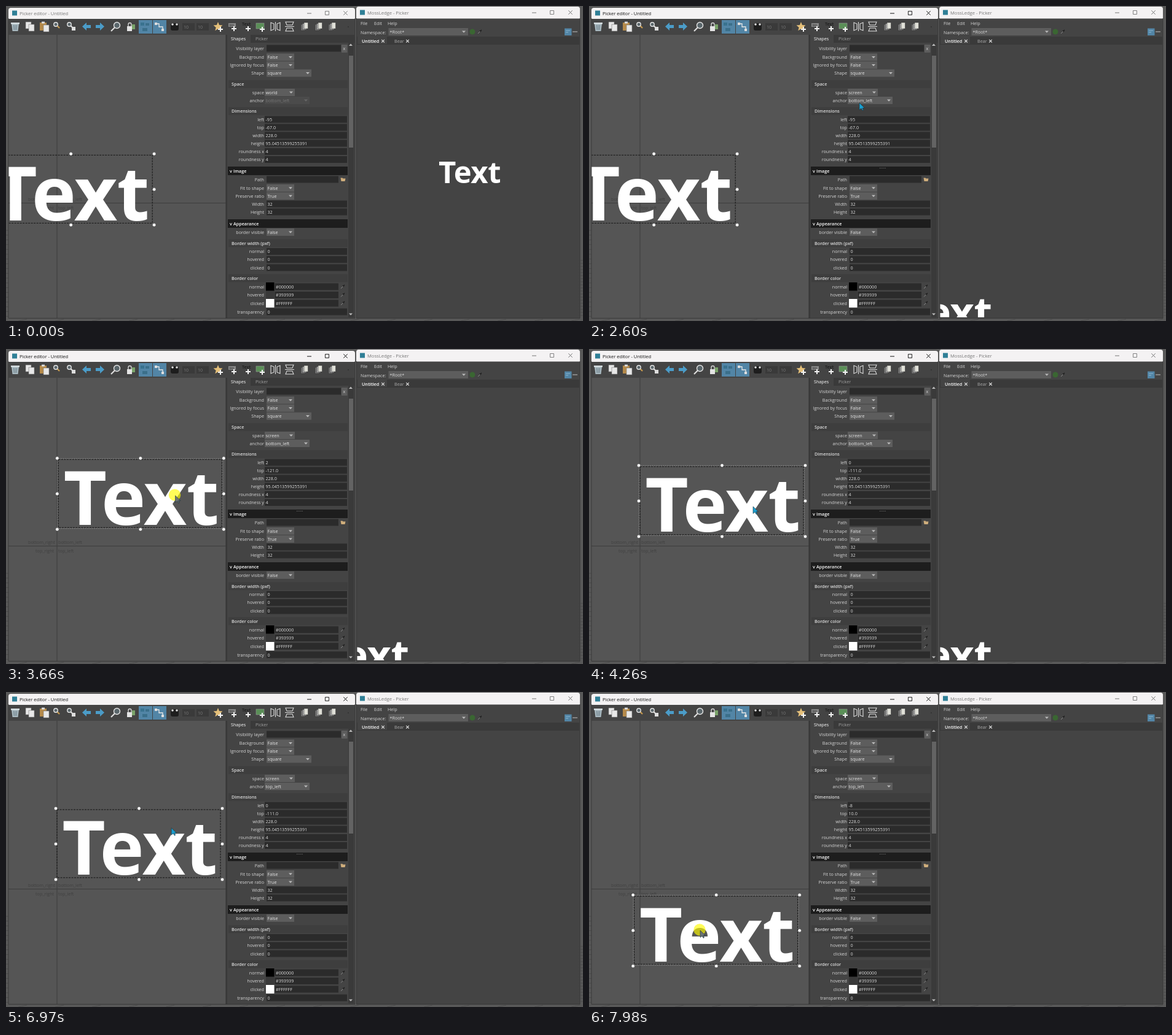
An HTML page for the animation above (8 s loop, 939 by 514 pixels).

```html
<!DOCTYPE html>
<html lang="en">
<head>
<meta charset="utf-8">
<title>Picker editor</title>
<style>
  html, body { margin: 0; width: 100%; height: 100%; overflow: hidden; background: #585858; }
  svg { display: block; width: 100%; height: 100%; font: 7.2px 'Open Sans', sans-serif; }
  text { white-space: pre; }
  .b { font-weight: 600; }
  .big { font-weight: 700; font-kerning: normal; letter-spacing: -.006em; fill: #fff; }
  .title { font-size: 7.6px; }
</style>
</head>
<body>
<svg viewBox="0 0 939 514" xmlns="http://www.w3.org/2000/svg"></svg>
<script>
const svg = document.querySelector('svg');
const $ = id => document.getElementById(id);
const INK = '#d6d6d6', PANEL = '#444', FIELD = '#2b2b2b', BUTTON = '#5d5d5d', BLUE = '#5285a6';

const rect = (x, y, w, h, fill, more = '') =>
  `<rect x="${x}" y="${y}" width="${w}" height="${h}" fill="${fill}" ${more}/>`;
const text = (x, y, s, fill = INK, more = '') =>
  `<text x="${x}" y="${y}" fill="${fill}" ${more}>${s}</text>`;
const fill = (d, color, more = '') => `<path d="${d}" fill="${color}" ${more}/>`;
const line = (d, color, w = 1, more = '') =>
  `<path d="${d}" fill="none" stroke="${color}" stroke-width="${w}" ${more}/>`;
const dot = (x, y, r, color, more = '') => `<circle cx="${x}" cy="${y}" r="${r}" fill="${color}" ${more}/>`;
const group = (id, body, more = '') => `<g id="${id}" ${more}>${body}</g>`;
const arrow = (x, y, color = '#bbb') => fill(`M${x - 3} ${y - 1.6}h6l-3 3.4z`, color);
const pencil = (x, y) =>
  line(`M${x - 3} ${y + 3}l4-4`, '#999', .8) + line(`M${x} ${y - 2}l2 2M${x + 1} ${y - 1}l2-2`, '#1c1c1c', 1.2);
const cross = (x, y, r, color, w = 1) =>
  line(`M${x - r} ${y - r}l${2 * r} ${2 * r}M${x + r} ${y - r}l${-2 * r} ${2 * r}`, color, w);

// Form rows of the property panel, placed by their middle line
const label = (y, s) => text(420, y + 2.6, s, INK, 'text-anchor="end"');
const field = (y, x, x2, s = '', id = '') =>
  rect(x, y - 5.5, x2 - x, 11, FIELD) + text(x + 1.5, y + 2.6, s, '#ddd', id && `id="${id}"`);
const combo = (y, x, x2, s, id = '') =>
  rect(x, y - 6, x2 - x, 12, BUTTON) +
  text(x + 1.5, y + 2.6, s, '#e4e4e4', id && `id="${id}"`) + arrow(x2 - 6, y);
const header = (y, s) => rect(362, y - 6.5, 194, 13, '#3e3e3e') + text(367, y + 2.6, s, '#ddd', 'class="b"');
const fold = (y, s) => rect(361, y - 7, 195, 14, '#1d1d1d') +
  text(364, y + 2.7, 'v', '#fff', 'class="b"') + text(370, y + 2.7, s, '#fff', 'class="b"');
const swatch = (y, s, c) => label(y, s) + rect(423, y - 7, 13.5, 14, c) + field(y, 437.5, 541, c) + pencil(548, y);

function titleBar(x, y, w, name, id) {
  const cy = 11.5 + (y - 3) / 2, r = x + w;
  const controls = line(`M${r - 78} ${cy + .5}h7`, 'currentColor') +
    line(`M${r - 48.5} ${cy - 3}h6v6h-6z`, 'currentColor', .9) + cross(r - 15.5, cy, 3.2, 'currentColor');
  return rect(x, y, w, 30, '#f4f2f3', 'rx="4"') + rect(x + 6, cy - 4, 8, 8, '#2f7f96') +
    group(id, text(x + 18, cy + 3, name, 'currentColor', 'class="title"') + controls, 'color="#777"');
}

const sheet = (x, y, c = '#e8e8e8') => rect(x, y, 9, 11, c, 'stroke="#777" stroke-width=".6"');
const lens = (x, y, r, side, handle = '#ddd') =>
  line(`M${x + side * r * .7} ${y + r * .7}l${side * r * 1.2} ${r * 1.2}`, handle, 2.2) +
  dot(x, y, r, '#5a666b', 'stroke="#e4e4e4" stroke-width="1.4"');
const plus = (x, y) => line(`M${x - 4} ${y}h8M${x} ${y - 4}v8`, '#f2f2f2', 2);

function toolbar() {
  const stacks = [486, 509, 531].map(x => ['#777', '#aaa', '#e0e0d8'].map((c, i) =>
    rect(x - 6 + i * 2.5, 30 - i * 1.5, 6.5, 10, c, 'stroke="#333" stroke-width=".5"')).join('')).join('');
  const move = (x, s) => fill(`M${x} 27v4h${7 * s}v5h${-7 * s}v4l${-7 * s}-6.5z`, '#4b9cc8');
  return rect(4, 21, 564, 26, PANEL) +
    fill('M9 29h12l-1.5 12h-9z', '#a9b9c0') + rect(8, 27, 14, 2.5, '#d5dde0') +
    line('M12.5 31l.5 8M15 31v8M17.5 31l-.5 8', '#6c7f88') +
    sheet(32, 26) + sheet(37, 30) +
    rect(55, 27, 11, 13, '#b58a4a') + rect(58, 25.5, 5, 3, '#ddd') + sheet(61, 31) +
    lens(81, 30, 3.2, 1, '#c79a4e') + lens(103, 30, 3.2, 1) + rect(107, 34, 6, 6, '#ddd') +
    move(131, 1) + move(153, -1) + lens(180.5, 31.5, 5, -1) +
    rect(197, 33, 8, 8, '#e4e4e4') + line('M199 33v-3a2.5 2.5 0 0 1 5 0v3', '#d8d8d8', 1.3) + rect(205, 30, 5, 8, '#7aa36a') +
    rect(216, 23, 22, 22, BLUE) + rect(239, 23, 22, 22, BLUE) +
    rect(219, 27, 6, 5, '#39728f') + rect(227, 28, 6, 4, '#3b6f8a') + rect(222, 36, 8, 5, '#3b6f8a') +
    line('M244 29h5v5h6v5', '#e8e8e8', 1.3) + rect(242, 27, 4, 4, '#ddd') + rect(253, 37, 4, 4, '#ddd') +
    rect(268, 28, 13, 12, '#1d1d1d', 'rx="3"') + dot(271, 30, 1.8, '#ddd') + dot(278, 30, 1.8, '#ddd') +
    rect(287, 28, 20, 12, '#3a3a3a') + text(289, 36.5, '10', '#777') +
    rect(310, 28, 20, 12, '#3a3a3a') + text(312, 36.5, '10', '#777') +
    fill('M345 26l2 5 5.5.4-4.2 3.5 1.4 5.3-4.7-2.9-4.7 2.9 1.4-5.3-4.2-3.5 5.5-.4z', '#e5c07a') + plus(349, 38) +
    rect(362, 28, 12, 6, '#888') + text(363.5, 33, 'btn', '#222', 'font-size="5"') + plus(371, 37) +
    text(384, 32, 'Text', '#1c1c1c', 'class="b"') + plus(394, 37) +
    rect(407, 28, 13, 9, '#5a8f57', 'stroke="#999" stroke-width=".6"') + plus(417, 38) +
    line('M438.5 26v15M436 29v9l-5 2v-13zM441 29v9l5 2v-13z', '#ddd', 1.1) +
    line('M454 33.5h15M457 31h9l2-5h-13zM457 36h9l2 5h-13z', '#ddd', 1.1) +
    stacks + dot(557, 34, .8, '#222');
}

function panel() {
  return rect(357.5, 47, 210.5, 463, PANEL) + rect(357.5, 47, 2.5, 463, '#393939') +
    rect(361, 47, 206, 13, '#3a3a3a') + rect(361, 47, 37, 14, PANEL) +
    text(366, 56, 'Shapes', '#fff') + text(406, 56, 'Picker', '#a0a0a0') +
    rect(557, 60, 9, 448, '#3a3a3a') + rect(558, 81, 7, 150, '#636363') +
    fill('M558 65h6l-3-3.5z', '#bbb') + arrow(561, 503) +
    label(69, 'Visibility layer') + field(69, 424, 545) + rect(546, 63, 9.5, 13, BUTTON) + text(548.5, 71.5, 'x') +
    label(83.5, 'Background') + combo(83.5, 424, 469, 'False') +
    label(96.5, 'Ignored by focus') + combo(96.5, 424, 469, 'False') +
    label(109.5, 'Shape') + combo(109.5, 424, 497, 'square') +
    header(127.5, 'Space') + label(141, 'space') + combo(141, 421, 470, 'world', 'space') +
    label(154, 'anchor') + group('anchorRow', combo(154, 421, 494, 'bottom_left', 'anchor')) +
    header(171.5, 'Dimensions') +
    label(185, 'left') + field(185, 421, 555, '-95', 'left') + label(198, 'top') + field(198, 421, 555, '-67.0', 'top') +
    label(211, 'width') + field(211, 421, 555, '228.0') + label(224, 'height') + field(224, 421, 555, '95.04513599255391') +
    label(237.5, 'roundness x') + field(237.5, 421, 555, '4') + label(250.5, 'roundness y') + field(250.5, 421, 555, '4') +
    fold(269, 'Image') + line('M473 264.5h10', '#777', 1, 'stroke-dasharray="1 1.2" id="grip"') +
    label(283, 'Path') + field(283, 424, 541) + fill('M544.5 280.5h3l1 1h4l-1 4.500h-6z', '#cfae7c') +
    label(297, 'Fit to shape') + combo(297, 424, 469, 'False') + label(310, 'Preserve ratio') + combo(310, 424, 469, 'True') +
    label(323, 'Width') + field(323, 424, 555, '32') + label(336, 'Height') + field(336, 424, 555, '32') +
    fold(355, 'Appearance') + label(369, 'border visible') + combo(369, 424, 469, 'False') +
    header(387, 'Border width (pxf)') +
    ['normal', 'hovered', 'clicked'].map((s, i) => label(400.5 + i * 13.2, s) + field(400.5 + i * 13.2, 424, 555, '0')).join('') +
    header(444, 'Border color') + swatch(458, 'normal', '#000000') + swatch(471.5, 'hovered', '#393939') +
    swatch(485, 'clicked', '#FFFFFF') + label(499, 'transparency') + field(499, 424, 555, '0');
}

function picker() {
  return titleBar(570, 1, 364, 'MossLedge - Picker', 'pickerTitle') +
    rect(570, 20.5, 364, 489.5, PANEL) +
    text(577, 31, 'File') + text(599, 31, 'Edit') + text(621, 31, 'Help') +
    text(577, 45.5, 'Namespace:') + rect(622.5, 36, 129.5, 12, BUTTON) + text(624.5, 44.7, '*Root*') + arrow(745, 42) +
    dot(759, 42, 4.5, '#3a6632') + pencil(771, 42) + rect(909, 36.5, 11.5, 11.5, BLUE) +
    line('M911 40h7M911 43h4', '#9cc3da', .8) + line('M922 42h8', '#999', 1.5) +
    rect(571, 50, 362, 13, '#3a3a3a') + rect(572, 50, 48, 13, PANEL) + rect(571, 62, 362, 1, '#383838') +
    text(579, 60, 'Untitled', '#fff', 'class="b"') + cross(613.5, 57.2, 2.3, '#ddd', 1.1) +
    text(632, 60, 'Bear', '#aaa') + cross(653.5, 57.2, 2.3, '#ddd', 1.1) +
    '<g clip-path="url(#view)">' + text(704, 289, 'Text', '#fff', 'class="big" id="shown"') + '</g>';
}

const popup = (id, y, w, rows) => group(id,
  rect(421, y, w, rows.length * 8.5 + 1, '#252525', 'stroke="#1a1a1a" stroke-width=".6"') +
  rect(421, y + .5, w, 8.5, BLUE, `id="${id}Row"`) +
  rows.map((s, i) => text(422, y + 7.6 + i * 8.5, s, '#eee')).join(''));

const edges = Array.from({ length: 19 }, (_, i) => `M0 ${366 + i * 7.8}h4M935 ${415 + i * 5}h4`).join('') +
  Array.from({ length: 16 }, (_, i) => `M${20 + i * 60} 514l14-3`).join('');

const handles = [0, 1, 2].flatMap(i => [0, 1, 2].map(j => i === 1 && j === 1 ? '' :
  dot(-2 + i * 135.5, -2 + j * 58, 2.7, '#fff', 'stroke="#333" stroke-width=".5"'))).join('');

svg.innerHTML = `<defs>
    <clipPath id="canvas"><rect x="4" y="47" width="353.5" height="462"/></clipPath>
    <clipPath id="view"><rect x="571.5" y="63" width="361" height="445"/></clipPath></defs>` +
  line(edges, '#474747', .8) +
  titleBar(4, 3, 564, 'Picker editor - Untitled', 'editorTitle') + toolbar() +
  rect(4, 47, 354, 463, '#555') + line('M83 47V510M4 321.5H358', '#3d3d3d') +
  text(36, 318, 'bottom_right', '#404040') + text(85, 318, 'bottom_left', '#404040') +
  text(48, 331.5, 'top_right', '#404040') + text(85, 331.5, 'top_left', '#404040') +
  '<g clip-path="url(#canvas)">' + group('shape',
    text(8.2, 106.5, 'Text', '#fff', 'class="big" font-size="122"') +
    rect(-1.5, -1.5, 269, 114, 'none', 'id="hover" stroke="#8a8a8a" stroke-width="1.2" stroke-dasharray="1.5 1.5"') +
    rect(0, 0, 266, 111, 'none', 'stroke="#141414" stroke-dasharray="3 1.5"') + handles) + '</g>' +
  panel() + picker() +
  line('M4 20V509.5H568V20M570.5 20V509.5H934V20', '#333', .8) +
  popup('spaceList', 147.5, 49, ['world', 'screen']) +
  popup('anchorList', 160.5, 71, ['top_left', 'top_right', 'bottom_left', 'bottom_right']) +
  group('cursor', dot(-1, -1, 9.7, '#fffa00', 'id="press" fill-opacity=".65"') +
    fill('M0 0V11.5L3 9L5 12.5L6.5 11.7L5 8.5H8.5Z', '#1b9fd0', 'id="tip" stroke="#16303a" stroke-width=".6"'));

// The screen refreshes in bursts: first moment, last moment, number of steps
const LOOP = 8000;
const bursts = [[140, 670, 9], [850, 990, 3], [1130, 1260, 3], [1460, 1660, 4], [1930, 2200, 4],
  [2600, 3390, 13], [3460, 4060, 10], [4260, 4800, 9], [4950], [5150], [5290], [5480, 5830, 6],
  [6310], [6510, 7240, 12], [7430, 7980, 9]];
const ticks = bursts.flatMap(([a, b = a, n = 1]) =>
  Array.from({ length: n }, (_, i) => Math.floor((a + (b - a) * i / (n - 1 || 1)) / 10) * 10));
const snap = t => ticks.filter(k => k <= t).pop() ?? 0;

const pointer = [[140, 862, 500], [670, 437, 136], [850, 437, 136], [990, 440, 140], [1460, 440, 140],
  [1660, 440, 158], [2600, 440, 158], [3060, 162, 303], [3320, 262, 275], [3700, 276, 238], [4060, 267, 257],
  [4260, 267, 257], [4800, 442, 151], [4950, 443, 150], [5480, 443, 150], [5830, 446, 163], [6510, 446, 163],
  [7240, 190, 248], [7430, 190, 248], [7700, 179, 368], [7980, 181, 389]];
const drag = [[3060, -95, -67], [3320, -15, -88], [3390, -8, -98], [3700, 3, -124], [4060, 0, -111],
  [7430, 0, -111], [7560, -2, -100], [7700, -6, -64], [7850, -8, -10], [7980, -8, 10]];
const presses = [[1130, 1260], [1930, 2110], [3060, 4060], [5150, 5290], [6310, 6510], [7430, LOOP]];

const smooth = p => p * p * (3 - 2 * p);
function at(keys, t, ease = p => p) {
  const i = keys.findIndex(k => k[0] > t);
  if (i < 0) return keys[keys.length - 1].slice(1);
  if (i === 0) return keys[0].slice(1);
  const [a, b] = [keys[i - 1], keys[i]], p = ease((t - a[0]) / (b[0] - a[0]));
  return [1, 2].map(n => a[n] + (b[n] - a[n]) * p);
}

const set = (id, attrs) => { for (const k in attrs) $(id).setAttribute(k, attrs[k]); };
const show = (id, on) => set(id, { visibility: on ? 'visible' : 'hidden' });
const write = (id, s) => { if ($(id).textContent !== s) $(id).textContent = s; };
const within = (t, a, b) => t >= a && t < b;

function draw(t) {
  const [cx, cy] = at(pointer, t, smooth);
  const [left, top] = at(drag, t).map(Math.round);
  const screen = t >= 2020, active = t >= 1190, moved = t >= 4320, topLeft = t >= 6510;
  const choosing = within(t, 5290, 6510);

  show('cursor', t >= 140);
  set('cursor', { transform: `translate(${cx} ${cy})` });
  show('press', presses.some(([a, b]) => within(t, a, b)));
  set('tip', { fill: within(t, 3060, 4060) || t >= 7430 ? '#6b7274' : '#1b9fd0' });
  set('editorTitle', { color: active ? '#111' : '#777' });
  show('grip', active);

  set('shape', { transform: `translate(${83 + left * 1.167} ${321.5 + top * 1.167})` });
  show('hover', within(t, 3000, 4500) || t >= 7000);
  write('left', String(left));
  write('top', top + '.0');

  write('space', screen ? 'screen' : 'world');
  write('anchor', topLeft ? 'top_left' : 'bottom_left');
  set('anchor', { y: choosing ? 157.6 : 156.6 });
  set('anchorRow', { opacity: screen ? 1 : .3 });
  show('spaceList', within(t, 1190, 2020));
  set('spaceListRow', { y: cy < 156 ? 148 : 156.5 });
  show('anchorList', choosing);
  set('anchorListRow', { y: t < 5550 ? 178 : 161 });

  // The picker only refreshes once a drag is released
  const [x, y] = moved ? [0, -111] : [-95, -67];
  set('shown', screen
    ? { x: 576.6 + x * .655, y: 567.7 + y * .655, 'font-size': 68.3 }
    : { x: 704, y: 289, 'font-size': 49 });
  show('shown', !topLeft);
}

function frame() {
  draw(snap(performance.now() % LOOP));
  requestAnimationFrame(frame);
}
frame();
</script>
</body>
</html>
```
